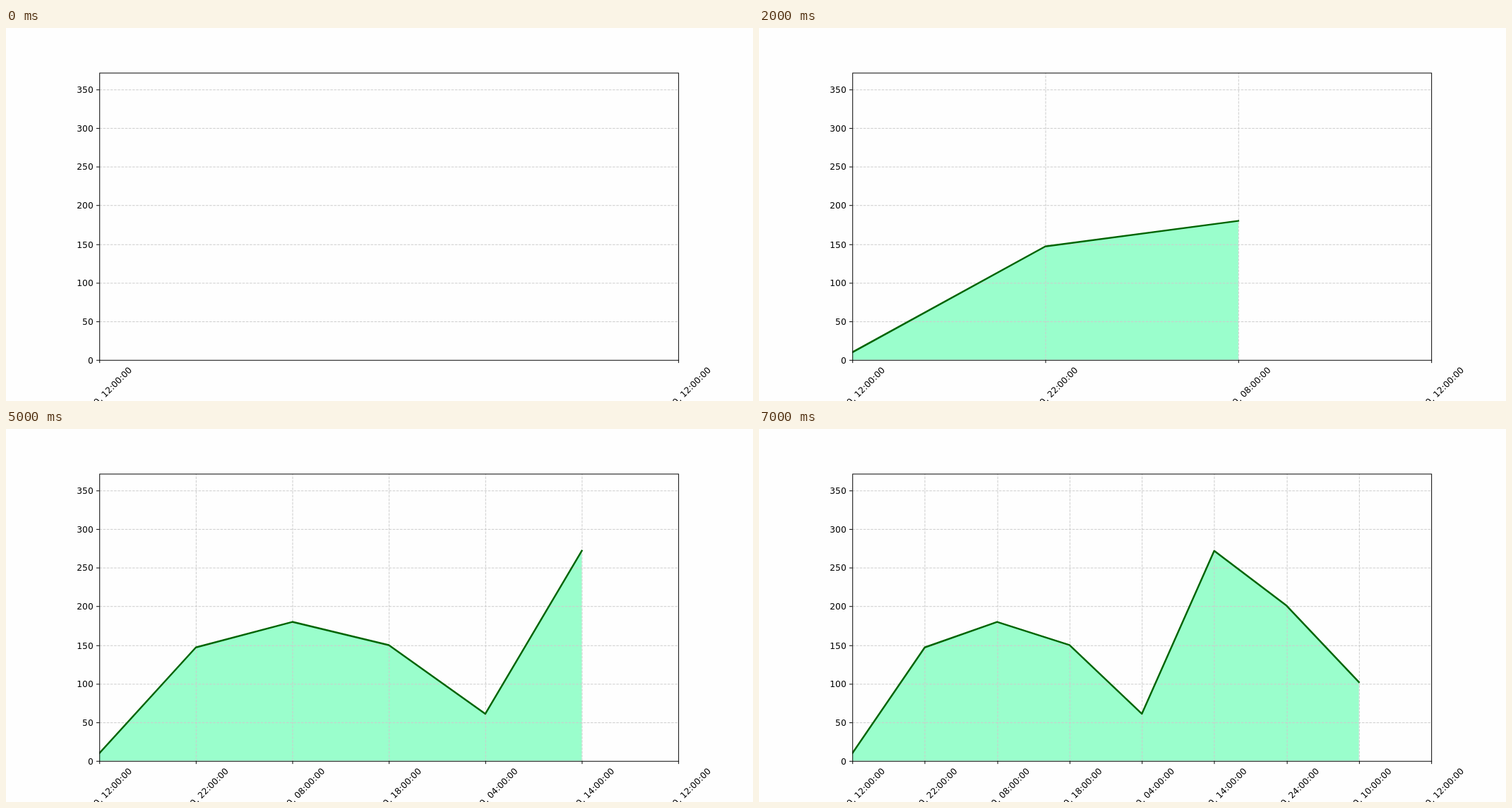
Write an HTML page with a canvas that moves like this. It is 1058x529 px and loops after 8000 ms.

```html
<!DOCTYPE html>
<html lang="en">
<head>
<meta charset="utf-8">
<title>Growing area chart</title>
<style>
  html, body { margin: 0; width: 100%; height: 100%; overflow: hidden; background: #fefefe; }
  canvas { display: block; width: 1058px; height: 529px; }
</style>
</head>
<body>
<canvas id="chart" width="1058" height="529"></canvas>
<script>
// The chart is laid out on a 1200 x 600 figure and scaled to the stage.
const W = 1200, H = 600;
const PT = 100 / 72;
const LEFT = 150, RIGHT = 1080, TOP = 72, BOTTOM = 534;
const THIN = 0.8 * PT, TICK = 3.5 * PT;
const STEP_MS = 1000, STEPS = 8;
const values = [10, 147, 180, 150, 61, 272, 201, 102];

const ctx = document.getElementById('chart').getContext('2d');
ctx.scale(1058 / W, 529 / H);

const yOf = v => BOTTOM - v * 1.2429;
const snap = n => Math.round(n) + 0.5;

// Ten hours between points, with midnight written as 24.
const hourOf = i => String((12 + 10 * i) % 24 || 24).padStart(2, '0');

function line(x1, y1, x2, y2) {
  ctx.beginPath();
  ctx.moveTo(x1, y1);
  ctx.lineTo(x2, y2);
  ctx.stroke();
}

function drawArea(xs) {
  ctx.beginPath();
  ctx.moveTo(xs[0], BOTTOM);
  xs.forEach((x, i) => ctx.lineTo(x, yOf(values[i])));
  ctx.lineTo(xs[xs.length - 1], BOTTOM);
  ctx.fillStyle = '#9afecc';
  ctx.fill();
}

function drawGrid(xs) {
  ctx.save();
  ctx.strokeStyle = '#ccc';
  ctx.lineWidth = THIN;
  ctx.setLineDash([3.7 * THIN, 1.6 * THIN]);
  xs.slice(1).forEach(x => line(snap(x), BOTTOM, snap(x), TOP));
  for (let v = 50; v <= 350; v += 50) line(LEFT, snap(yOf(v)), RIGHT, snap(yOf(v)));
  ctx.restore();
}

function drawCurve(xs) {
  ctx.beginPath();
  xs.forEach((x, i) => ctx.lineTo(x, yOf(values[i])));
  ctx.strokeStyle = '#006400';
  ctx.lineWidth = 2 * PT;
  ctx.lineCap = 'square';
  ctx.lineJoin = 'round';
  ctx.stroke();
}

function timeLabel(hour, x) {
  ctx.save();
  ctx.translate(x + 53, BOTTOM + 17.2);
  ctx.rotate(-Math.PI / 4);
  ctx.fillText(`2020, ${hour}:00:00`, 0, 0);
  ctx.restore();
}

function drawAxes(xs) {
  ctx.strokeStyle = ctx.fillStyle = '#000';
  ctx.lineWidth = THIN;
  ctx.lineCap = 'butt';
  ctx.strokeRect(snap(LEFT), snap(TOP), RIGHT - LEFT, BOTTOM - TOP);
  ctx.font = `${10 * PT}px "DejaVu Sans", sans-serif`;
  ctx.textAlign = 'right';
  for (let v = 0; v <= 350; v += 50) {
    const y = snap(yOf(v));
    line(LEFT - TICK, y, LEFT, y);
    ctx.fillText(v, LEFT - 2 * TICK, y + 5);
  }
  [...xs, RIGHT].forEach((x, i) => {
    line(snap(x), BOTTOM, snap(x), BOTTOM + TICK);
    timeLabel(hourOf(i < xs.length ? i : 0), x);
  });
}

function draw(step) {
  const xs = Array.from({ length: step + 1 }, (_, i) => LEFT + (RIGHT - LEFT) * i / (step + 1));
  ctx.fillStyle = '#fefefe';
  ctx.fillRect(0, 0, W, H);
  ctx.save();
  ctx.beginPath();
  ctx.rect(LEFT, TOP, RIGHT - LEFT, BOTTOM - TOP);
  ctx.clip();
  if (step) drawArea(xs);
  drawGrid(xs);
  if (step) drawCurve(xs);
  ctx.restore();
  drawAxes(xs);
}

const start = performance.now();
let shown = -1;
function tick() {
  const step = Math.floor((performance.now() - start) / STEP_MS) % STEPS;
  if (step !== shown) draw(shown = step);
  requestAnimationFrame(tick);
}
tick();
</script>
</body>
</html>
```
